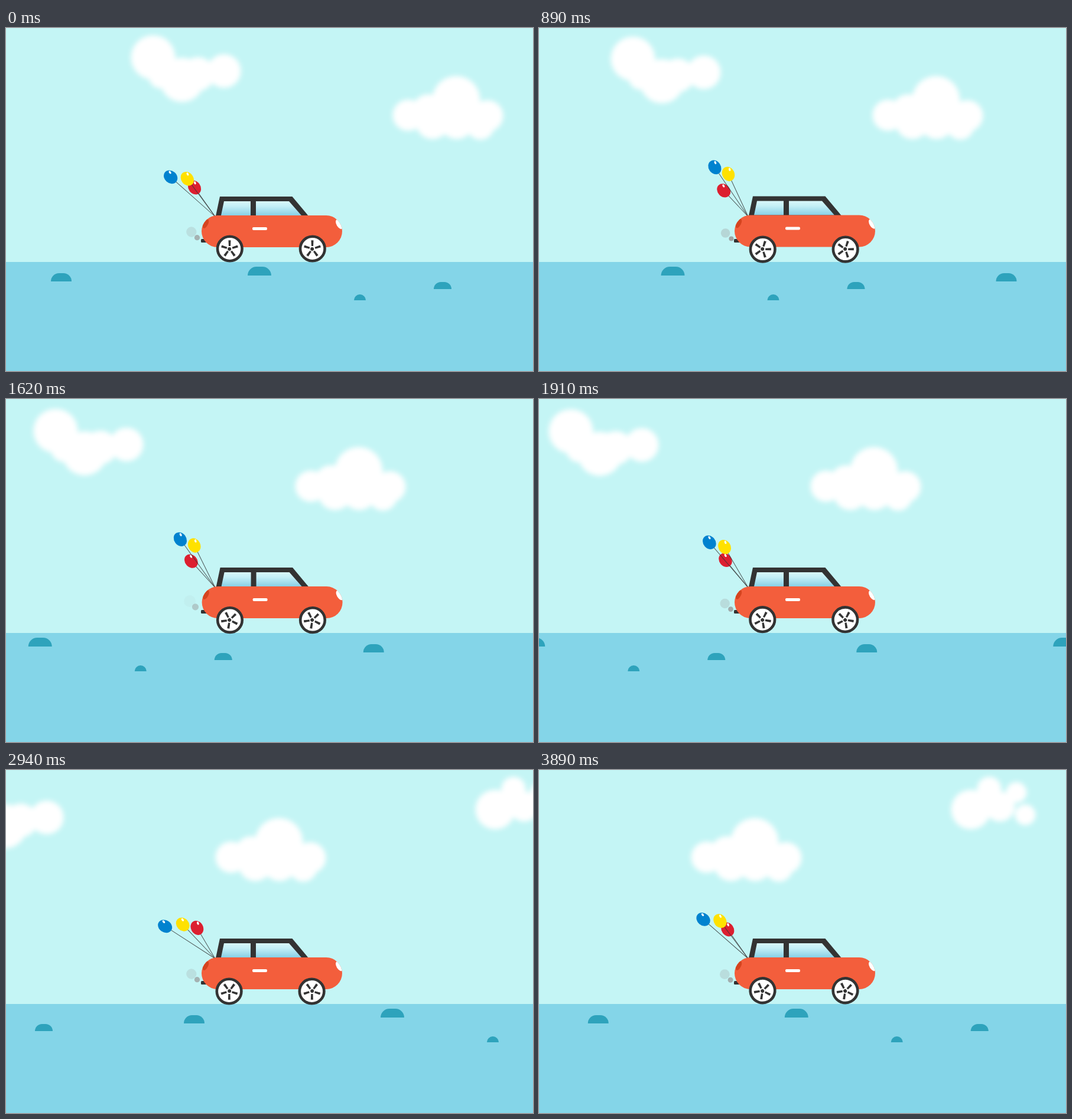
These frames come from a looping animation (892 by 582 pixels, 3.99 s). An HTML page:

```html
<!DOCTYPE html>
<html lang="en">
<head>
<meta charset="utf-8">
<title>Road trip</title>
<style>
  html, body { margin: 0; width: 100%; height: 100%; overflow: hidden; background: #c4f5f5; }
  svg { display: block; width: 892px; height: 582px; }
</style>
</head>
<body>
<svg id="stage" viewBox="0 0 892 582">
  <defs>
    <linearGradient id="glass" x1="0" y1="0" x2="0" y2="1">
      <stop offset="0" stop-color="#d9f8fb"/>
      <stop offset=".35" stop-color="#c4eff6"/>
      <stop offset="1" stop-color="#88d0e6"/>
    </linearGradient>
    <filter id="soft" x="-20%" y="-20%" width="140%" height="140%">
      <feGaussianBlur stdDeviation="4.5"/>
    </filter>
    <clipPath id="shell"><rect x="331" y="318" width="238" height="54" rx="27"/></clipPath>
  </defs>

  <rect width="892" height="582" fill="#c4f5f5"/>
  <g id="clouds" fill="#fff"></g>
  <rect y="397" width="892" height="185" fill="#84d5e8"/>
  <g id="hills" fill="#2ea3bc"></g>

  <g id="balloons"></g>
  <circle id="puffBig" fill="#999"/>
  <circle id="puffSmall" fill="#999"/>
  <rect x="330" y="358" width="14" height="6" rx="1.5" fill="#333"/>

  <g id="car">
    <path d="M362 286H484.5L512 319H355Z" fill="#333"/>
    <path d="M369 294H414V318H364Z M423 294H479L500 318H423Z" fill="url(#glass)"/>
    <rect x="331" y="318" width="238" height="54" rx="27" fill="#f35e3c"/>
    <g clip-path="url(#shell)">
      <ellipse rx="4" ry="8.5" transform="translate(338 332) rotate(27)" fill="#d5441f"/>
      <ellipse rx="4.5" ry="9" transform="translate(564 333) rotate(-30)" fill="#fff"/>
    </g>
    <rect x="417" y="338" width="25" height="5" rx="2" fill="#fff"/>
  </g>
  <g id="wheels"></g>
</svg>

<script>
const LOOP = 3990, STEP = 150, LAST = 3970;
const $ = id => document.getElementById(id);

function add(parent, tag, attrs) {
  const el = document.createElementNS('http://www.w3.org/2000/svg', tag);
  set(el, attrs);
  return parent.appendChild(el);
}
function set(el, attrs) {
  for (const name in attrs) el.setAttribute(name, attrs[name]);
}
const move = (el, x, y) => el.setAttribute('transform', `translate(${x} ${y})`);

// Clouds: circles as [x, y, outer radius], plus vertical drift in px/s.
const clouds = [
  { drift: 2.5, end: 3900, blobs: [[249, 50, 45], [298, 88, 45], [369, 73, 36], [325, 78, 36], [262, 82, 28]] },
  { drift: 0, end: LOOP, blobs: [[681, 148, 34], [762, 122, 48], [815, 149, 34], [722, 160, 36], [763, 160, 36], [803, 166, 31], [715, 140, 35]] },
  { drift: 0, end: LOOP, blobs: [[1128, 67, 41], [1159, 32, 28], [1205, 38, 25], [1220, 76, 25], [1177, 62, 33]] }
];
for (const c of clouds) {
  c.el = add($('clouds'), 'g', {});
  const body = add(c.el, 'g', { filter: 'url(#soft)' });
  for (const [cx, cy, r] of c.blobs) add(body, 'circle', { cx, cy, r: r - 7.5 });
}

// Hills: [x, baseline, width, height]; the strip repeats every 900 px.
for (const [x, y, w, h] of [[76, 430, 35, 14], [409, 420, 40, 15], [589, 462, 20, 10], [724, 443, 30, 12]])
  for (const shift of [0, 900])
    add($('hills'), 'path', { d: `M${x + shift} ${y}a${h} ${h} 0 0 1 ${h} ${-h}h${w - 2 * h}a${h} ${h} 0 0 1 ${h} ${h}z` });

// Balloons: string length, angle at the two ends of the swing.
const balloons = [
  { fill: '#dc1f30', len: 60.5, from: 28.5, to: 45.9 },
  { fill: '#ffe100', len: 79.7, from: 46.2, to: 20.8 },
  { fill: '#0082cf', len: 101, from: 60.6, to: 29 }
];
for (const b of balloons) {
  b.el = add($('balloons'), 'g', {});
  add(b.el, 'path', { d: `M0 0V${12 - b.len}`, stroke: '#333', 'stroke-opacity': .8 });
  const top = add(b.el, 'g', { transform: `translate(0 ${-b.len})` });
  add(top, 'ellipse', { rx: 10.3, ry: 12.6, fill: b.fill });
  add(top, 'ellipse', { rx: 1.7, ry: 2.8, fill: '#fff', transform: 'translate(5.2 -6) rotate(12)' });
}

// Wheels: the tyre sits slightly off the axle, so it wobbles.
const wheels = [378.2, 518.2].map(x => {
  const axle = add($('wheels'), 'g', { transform: `translate(${x} 375)` });
  const el = add(axle, 'g', {});
  add(el, 'circle', { cx: .6, cy: -.5, r: 20.8, fill: '#fff', stroke: '#333', 'stroke-width': 4.6 });
  add(el, 'circle', { r: 3, fill: '#333' });
  for (let a = 0; a < 360; a += 72)
    add(el, 'path', { d: 'M-1.6 -4.8L-2 -14.5H2L1.6 -4.8Z', fill: '#333', transform: `translate(.3 -.2) rotate(${a})` });
  return el;
});

// Car shake over one half second: [phase, x, y].
const shake = [[0, 0, 0], [.2, 1, .2], [.45, 0, 0], [.7, 0, -1], [.9, 0, 0], [1, 0, 0]];
function shakeAt(p) {
  const i = shake.findIndex(k => k[0] > p);
  const a = shake[i - 1], b = shake[i], f = (p - a[0]) / (b[0] - a[0]);
  return [a[1] + (b[1] - a[1]) * f, a[2] + (b[2] - a[2]) * f];
}

function draw(t) {
  for (const c of clouds) {
    move(c.el, -t * .1, t / 1000 * c.drift);
    c.el.style.display = t < c.end ? '' : 'none';
  }
  move($('hills'), -t * .225, 0);

  const swing = Math.abs(((t + 780) % 4000) / 2000 - 1);
  for (const b of balloons)
    b.el.setAttribute('transform', `translate(354 320) rotate(${-(b.to + (b.from - b.to) * swing)})`);

  const p = ((t + 300) % 500) / 500;
  set($('puffBig'), { cx: 319.2 - 9 * p, cy: 352 - 10 * p, r: 6 + 4.4 * p, opacity: .56 - .56 * p });
  set($('puffSmall'), { cx: 329.5 - 10 * p, cy: 361.2 - 9.2 * p, r: 2.8 + 3.1 * p, opacity: Math.min(1, 1.2 - .8 * p) });

  move($('car'), ...shakeAt((t % 500) / 500));
  for (const w of wheels) w.setAttribute('transform', `rotate(${t % 400 * .9})`);
}

// The picture advances in hard steps of 140 to 150 ms, with a long one near the end.
const starts = [0];
for (let k = 1; k < 26; k++) starts.push(Math.floor((k * 146.7 + 6.5) / 10) * 10);

const begin = performance.now();
function tick() {
  const now = (performance.now() - begin) % LOOP;
  const step = starts.filter(s => s <= now).length - 1;
  draw(now >= 3890 ? LAST : step * STEP);
  requestAnimationFrame(tick);
}
tick();
</script>
</body>
</html>
```
